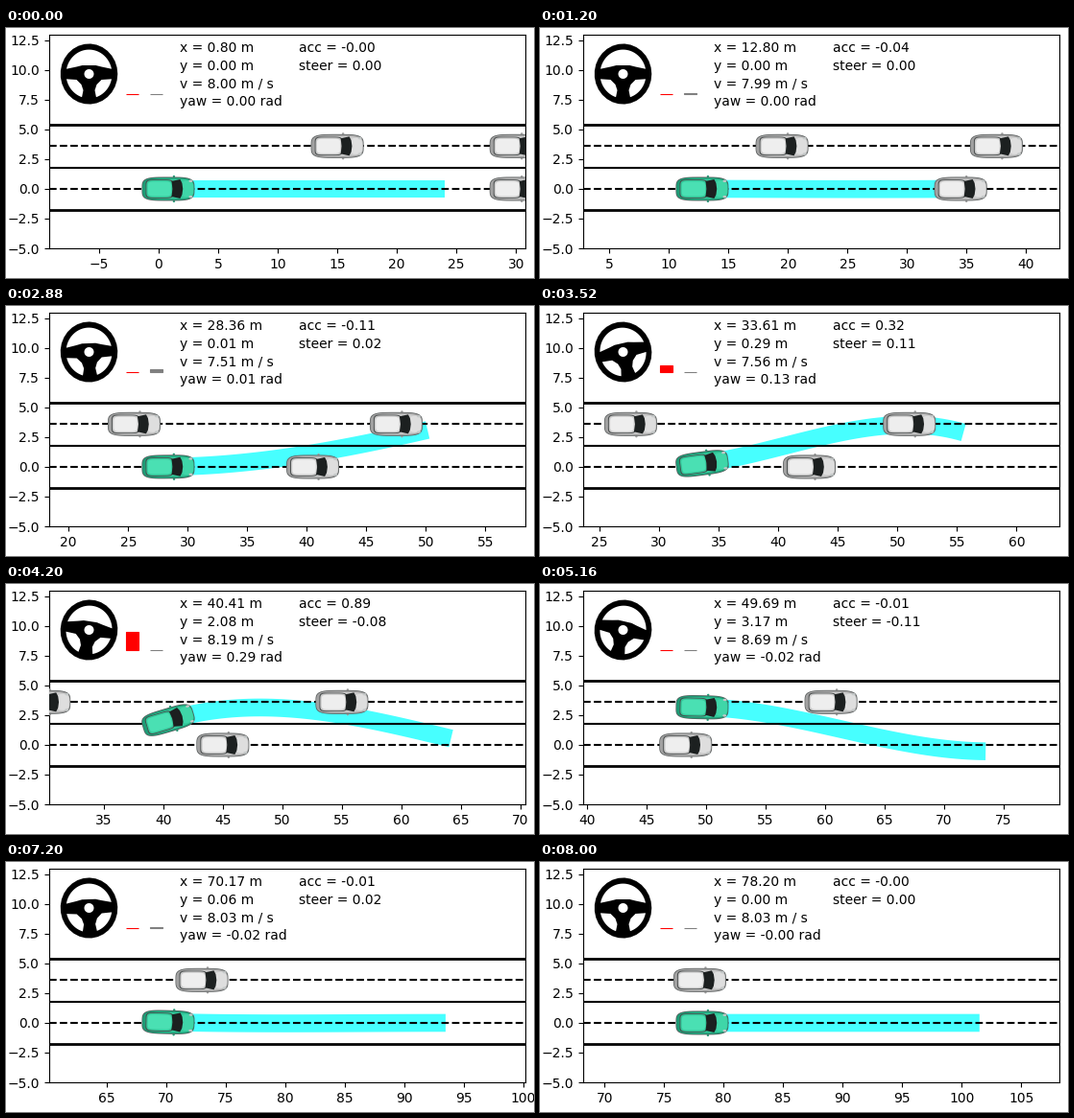
Recreate the animation shown at these times as a matplotlib script. Size 550 by 261 pixels, loop 9000 ms.

```python
import numpy as np
import matplotlib.pyplot as plt
from matplotlib.animation import FuncAnimation
from matplotlib.patches import Polygon, Rectangle
from matplotlib.ticker import MultipleLocator
from matplotlib.transforms import Affine2D

W, H, DPI = 550, 261, 100
TICK, LOOP = 40, 9000
PX = 12.4                      # pixels per metre
DT = 0.1                       # simulated seconds per step
WHEELBASE = 2.5
LANES = (0.0, 3.6)
LAST = 97


def bump(n, peak, width, power=2):
    return np.exp(-(np.abs(n - peak) / width) ** power)


def integrate(start, rate):
    return start + np.concatenate([[0], np.cumsum((rate[1:] + rate[:-1]) / 2)])


def plan_end(n):
    """Lateral position where the planned path ends."""
    return 3.4 * bump(n, 38, 10) - 0.55 * bump(n, 62, 8)


# The ego brakes, overtakes with a skewed swerve, and settles again
steps = np.arange(LAST + 1)
acc = -0.38 * bump(steps, 27, 8) + 0.9 * bump(steps, 50, 8) - 0.5 * bump(steps, 72, 8)
speed = integrate(8, DT * acc)
PEAK = 61.6
y = 3.17 * np.where(steps < PEAK, bump(steps, PEAK, 14.4, 2.83),
                    bump(steps, PEAK, 12.8))
dy = np.gradient(y)
dx = np.sqrt((DT * speed) ** 2 - dy ** 2)
x = integrate(0.8, dx)
yaw = np.arctan2(dy, dx)
steer = np.arctan(WHEELBASE * np.diff(yaw, append=yaw[-1]) / DT / speed)
states = np.column_stack([x, y, speed, yaw, acc, steer])

# Each step lasts two ticks; now and then one lasts three
start_tick = (2 * steps - 1 + np.minimum((steps - 1) // 10.1, 6)
              + (steps >= 90))


def plan_band(n):
    """Cubic from the ego's pose to the goal, widened to a ribbon."""
    length = min(2.9 * speed[n], 23.8)
    u = np.linspace(0, 1, 50)
    end = plan_end(n)
    slope_in = length * np.tan(yaw[n])
    slope_out = length * (plan_end(n + 0.5) - plan_end(n - 0.5)) / (8 * DT)
    rise = end - y[n]
    path_y = y[n] + u * (slope_in + u * (3 * rise - 2 * slope_in - slope_out
                                         + u * (slope_in + slope_out - 2 * rise)))
    path_x = x[n] + length * u
    angle = np.arctan2(np.gradient(path_y), np.gradient(path_x))
    side = 0.75 * np.column_stack([-np.sin(angle), np.cos(angle)])
    mid = np.column_stack([path_x, path_y])
    return np.vstack([mid + side, (mid - side)[::-1]])


def blob(cx, cy, rx, ry, power=2):
    t = np.linspace(0, 2 * np.pi, 60)
    c, s = np.cos(t), np.sin(t)
    e = 2 / power
    return np.column_stack([cx + rx * np.sign(c) * abs(c) ** e,
                            cy + ry * np.sign(s) * abs(s) ** e])


def arc(radius, start, end):
    t = np.radians(np.linspace(start, end, 30))
    return np.column_stack([radius * np.cos(t), 1.06 * radius * np.sin(t)])


fig = plt.figure(figsize=(W / DPI, H / DPI), dpi=DPI, facecolor="white")
ax = fig.add_axes([44.85 / W, 31 / H, 496.3 / W, 223.3 / H])
ax.set_ylim(-5, 13)
ax.xaxis.set_major_locator(MultipleLocator(5))
ax.yaxis.set_major_locator(MultipleLocator(2.5))

for level, width in ((5.4, 2), (1.8, 1.5), (-1.8, 2)):
    ax.axhline(level, color="black", lw=width)
for lane in LANES:
    ax.axhline(lane, ls="--", color="black", lw=1.5)

band = ax.add_patch(Polygon([[0, 0], [1, 0], [1, 1]], fc="cyan", ec="none",
                            alpha=0.72, zorder=1))


def add_shape(points, color, transform, zorder, edge="none", lw=0):
    ax.add_patch(Polygon(points, fc=color, ec=edge, lw=lw, zorder=zorder,
                         transform=transform))


def make_car(dark, mid, light, roof):
    """Draw a top view in pixels; return its movable pose."""
    pose = Affine2D()
    place = Affine2D().scale(1 / PX) + pose + ax.transData
    mirrors = [(blob(6, 13 * side, 1.2, 1.1), dark) for side in (-1, 1)]
    lamps = [(blob(23.5, 8.2 * side, 2, 1.2), "#c4c8c8") for side in (-1, 1)]
    body = [(blob(0, 0, 27.5, 12.5, 4), "#5a5e5e"),
            (blob(0, 0, 26.8, 11.8, 4), dark),
            (blob(1.5, 0, 25, 10.4, 4), mid),
            (blob(19.5, 0, 6.5, 8.5, 3), light)]
    cabin = [(blob(-9, 0, 14.5, 9.8, 6), "#454949"),
             (blob(-9, 0, 13.6, 9, 6), mid),
             (blob(-9, 0, 12.2, 7.6, 6), roof),
             ([(3.5, -8), (12.5, -10), (14.5, -6), (15.3, 0), (14.5, 6),
               (12.5, 10), (3.5, 8), (4.6, 0)], "#1c2020")]
    for i, (points, color) in enumerate(mirrors + body + lamps + cabin):
        add_shape(points, color, place, 5 + 0.01 * i)
    return pose


GREY = ("#a2a2a2", "#cbcbcb", "#dedede", "#eeeeee")
GREEN = ("#1e9c76", "#34c99b", "#3fd6a8", "#4ae0b3")
ego = make_car(*GREEN)
# pose, start, speed, lane
traffic = [(make_car(*GREY), 15, 3, LANES[1]),
           (make_car(*GREY), 30, 5, LANES[1]),
           (make_car(*GREY), 30, 3, LANES[0])]

# Steering wheel, in stage pixels around its hub
wheel = Affine2D()
wheel_place = (wheel + Affine2D().translate(86.5, H - 48)
               + Affine2D().scale(1 / W, 1 / H) + fig.transFigure)
add_shape(arc(29.8, 0, 360), "black", wheel_place, 6)
upper = np.vstack([arc(24, 12, 168), [(-13, 7.5), (-7, 9), (7, 9), (13, 7.5)]])
add_shape(upper, "white", wheel_place, 6.1)
for mirror in (-1, 1):
    lower = np.vstack([arc(24, 192, 252), [(-6, -17), (-8, -11), (-13, -6)]])
    add_shape(lower * (mirror, 1), "white", wheel_place, 6.1)
add_shape(blob(0, 0, 5, 5), "white", wheel_place, 6.2)

throttle, brake = [ax.add_patch(Rectangle((0, 8), 1, 0, fc=color, ec=color,
                                          lw=0.8, zorder=4))
                   for color in ("red", "gray")]


def label(column, row):
    return ax.text(column / 40, (16.5 - 1.5 * row) / 18, "",
                   transform=ax.transAxes, fontsize=10,
                   family="DejaVu Sans", zorder=7)


FORMATS = ("x = {:.2f} m", "y = {:.2f} m", "v = {:.2f} m / s",
           "yaw = {:.2f} rad", "acc = {:.2f}", "steer = {:.2f}")
labels = [label(11, row) for row in range(4)] + [label(21, row) for row in range(2)]


def update(tick):
    n = int(np.searchsorted(start_tick, tick, side="right")) - 1
    ax.set_xlim(x[n] - 10, x[n] + 30)
    ego.clear().rotate(yaw[n]).translate(x[n], y[n])
    time = DT * (n - (n >= 43))    # traffic pauses for one step
    for pose, start, pace, lane in traffic:
        pose.clear().translate(start + pace * time, lane)
    band.set_xy(plan_band(n))
    wheel.clear().rotate(2 * steer[n])
    throttle.set_x(x[n] - 3.5)
    throttle.set_height(1.7 * max(acc[n], 0))
    brake.set_x(x[n] - 1.5)
    brake.set_height(1.7 * max(-acc[n], 0))
    for text, form, value in zip(labels, FORMATS, states[n]):
        text.set_text(form.format(value))
    return []


anim = FuncAnimation(fig, update, frames=LOOP // TICK, interval=TICK,
                     repeat=True, repeat_delay=0, blit=False)
plt.show()
```
